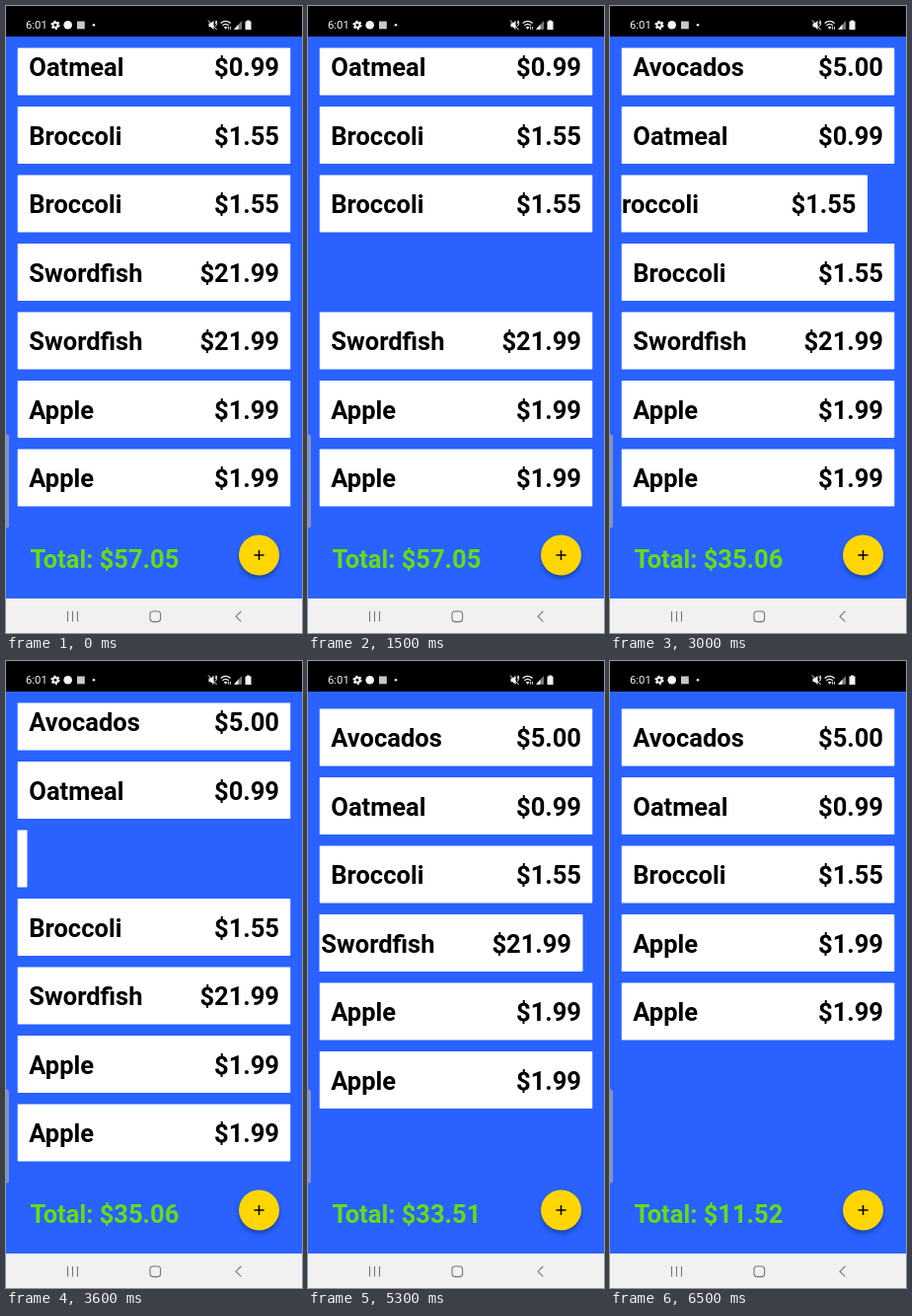
Recreate the animation shown at these times as an HTML page. Size 300x636 px, loop 8 s.

```html
<!DOCTYPE html>
<html lang="en">
<head>
<meta charset="utf-8">
<title>Shopping list</title>
<style>
  html, body { margin: 0; width: 100%; height: 100%; overflow: hidden; background: #2962ff; }
  svg { display: block; width: 300px; height: 636px; font-family: Roboto, sans-serif; }
  .big { font-size: 25.5px; font-weight: 700; }
  .end { text-anchor: end; }
</style>
</head>
<body>
<svg viewBox="0 0 300 636">
  <defs>
    <clipPath id="view"><rect x="11.5" y="42.5" width="277" height="470.5"/></clipPath>
    <filter id="blur" x="-50%" y="-50%" width="200%" height="200%"><feGaussianBlur stdDeviation="2.6"/></filter>
  </defs>
  <rect width="300" height="636" fill="#2962ff"/>
  <g id="list" clip-path="url(#view)"></g>

  <text id="total" class="big" x="24.5" y="569.5" fill="#64dd17"></text>
  <circle cx="256.5" cy="560" r="20" fill="#000" opacity=".38" filter="url(#blur)"/>
  <circle cx="256.5" cy="557" r="20.5" fill="#ffd600"/>
  <path d="M251.4 557h10.2M256.5 551.9v10.2" stroke="#000" stroke-width="1.5"/>
  <rect x="-3" y="434.5" width="6" height="95" rx="2.5" fill="#7f93c8"/>

  <!-- status bar -->
  <rect width="300" height="31" fill="#000"/>
  <g fill="#f4f4f4">
    <text x="20" y="23.3" font-size="11.3">6:01</text>
    <circle cx="50" cy="19.3" r="2.5" fill="none" stroke="#f4f4f4" stroke-width="2"/>
    <circle cx="50" cy="19.3" r="3.9" fill="none" stroke="#f4f4f4" stroke-width="1.5" stroke-dasharray="2.04"/>
    <circle cx="62.7" cy="19.3" r="4.3"/>
    <rect x="72" y="15.5" width="7.8" height="7.8" fill="#c8c8c8"/>
    <circle cx="89" cy="19.3" r="1.3"/>
    <path d="M205.5 17.5h2l3-2.8v9.4l-3-2.8h-2z"/>
    <path d="M205 14.5l8.5 9.5M212.2 15.5q1 1.3 0 2.6M212.5 20.5q2.2-3 .5-6" fill="none" stroke="#f4f4f4"/>
    <path d="M217.6 17.6q5-4.4 10 0M219.4 19.8q3.2-2.8 6.4 0" fill="none" stroke="#f4f4f4" stroke-width="1.3"/>
    <path d="M220.8 21.5q1.8-1.4 3.6 0l-1.8 2.3z"/>
    <path d="M225.4 23.8v-3M227.4 20.8v3" stroke="#f4f4f4" stroke-width=".9"/>
    <path d="M231 23.8l8-8.8v8.8z" fill="#777"/>
    <path d="M231 23.8l4.5-5v5z"/>
    <path d="M242.5 15.6h1.6v-1.2h2.8v1.2h1.6v8.4h-6z"/>
  </g>

  <!-- navigation bar -->
  <rect y="601" width="300" height="35" fill="#f1f1f1"/>
  <g fill="none" stroke="#777" stroke-width="1.1">
    <path d="M62.5 614v10.5M67.5 614v10.5M72.5 614v10.5"/>
    <rect x="146" y="614" width="10.6" height="10.6" rx="3"/>
    <path d="M238.3 614l-5.3 5.2 5.3 5.2"/>
  </g>
</svg>
<script>
const LOOP = 8000, TICK = 100;
const PITCH = 69.5, TOP = 48.5, VIEW = 470.5, SHIFT = 300;
const items = [
  ['Avocados', 5], ['Oatmeal', .99], ['Broccoli', 1.55], ['Broccoli', 1.55],
  ['Swordfish', 21.99], ['Swordfish', 21.99], ['Apple', 1.99], ['Apple', 1.99]
];
// swipe: [time, x offset]; the row leaves the layout at `start`
const drops = [
  { item: 4, start: 1524, swipe: [[800, 0], [900, 48], [1000, 84], [1100, 114], [1250, 140], [1500, 300]] },
  { item: 2, start: 3680, swipe: [[2900, 0], [3000, -27.5], [3100, -58], [3200, -90], [3400, -135], [3650, -300]] },
  { item: 5, start: 5870, swipe: [[5200, 0], [5300, -10], [5400, -50], [5500, -95], [5600, -135], [5850, -300]] }
];

const svg = (tag, attrs, parent, text = '') => {
  const el = document.createElementNS('http://www.w3.org/2000/svg', tag);
  for (const k in attrs) el.setAttribute(k, attrs[k]);
  el.textContent = text;
  return parent.appendChild(el);
};
const money = v => '$' + v.toFixed(2);
const ease = u => (1 - Math.cos(Math.PI * Math.min(1, Math.max(0, u)))) / 2;

const list = document.getElementById('list');
const total = document.getElementById('total');
const rows = items.map(([name, price]) => {
  const g = svg('g', {}, list);
  svg('rect', { x: 11.5, width: 277, height: 58, rx: .7, fill: '#fff' }, g);
  svg('text', { class: 'big', x: 23.3, y: 38.8 }, g, name);
  svg('text', { class: 'big end', x: 277, y: 38.8 }, g, money(price));
  return g;
});

// Row tops for the items left, scrolled to the end of the list
function layout(live) {
  const scroll = Math.max(0, live.length * PITCH - VIEW);
  return new Map(live.map((id, k) => [id, TOP + k * PITCH - scroll]));
}

function along(keys, t) {
  if (t <= keys[0][0]) return keys[0][1];
  for (let i = 1; i < keys.length; i++) {
    const [t0, x0] = keys[i - 1], [t1, x1] = keys[i];
    if (t < t1) return x0 + (x1 - x0) * (t - t0) / (t1 - t0);
  }
  return keys[keys.length - 1][1];
}

function draw(t) {
  let live = items.map((_, id) => id);
  let tops = layout(live);
  for (const d of drops) {
    if (t < d.start) break;
    live = live.filter(id => id !== d.item);
    const next = layout(live), u = ease((t - d.start) / SHIFT);
    tops = new Map(live.map(id => [id, tops.get(id) + (next.get(id) - tops.get(id)) * u]));
  }
  rows.forEach((row, id) => {
    const shown = tops.has(id), drop = drops.find(d => d.item === id);
    row.setAttribute('visibility', shown ? 'visible' : 'hidden');
    if (shown) row.setAttribute('transform', `translate(${drop ? along(drop.swipe, t) : 0} ${tops.get(id)})`);
  });
  total.textContent = 'Total: ' + money(live.reduce((sum, id) => sum + items[id][1], 0));
}

const begin = performance.now();
function frame() {
  const t = (performance.now() - begin) % LOOP;
  draw(Math.floor(t / TICK) * TICK);
  requestAnimationFrame(frame);
}
frame();
</script>
</body>
</html>
```
